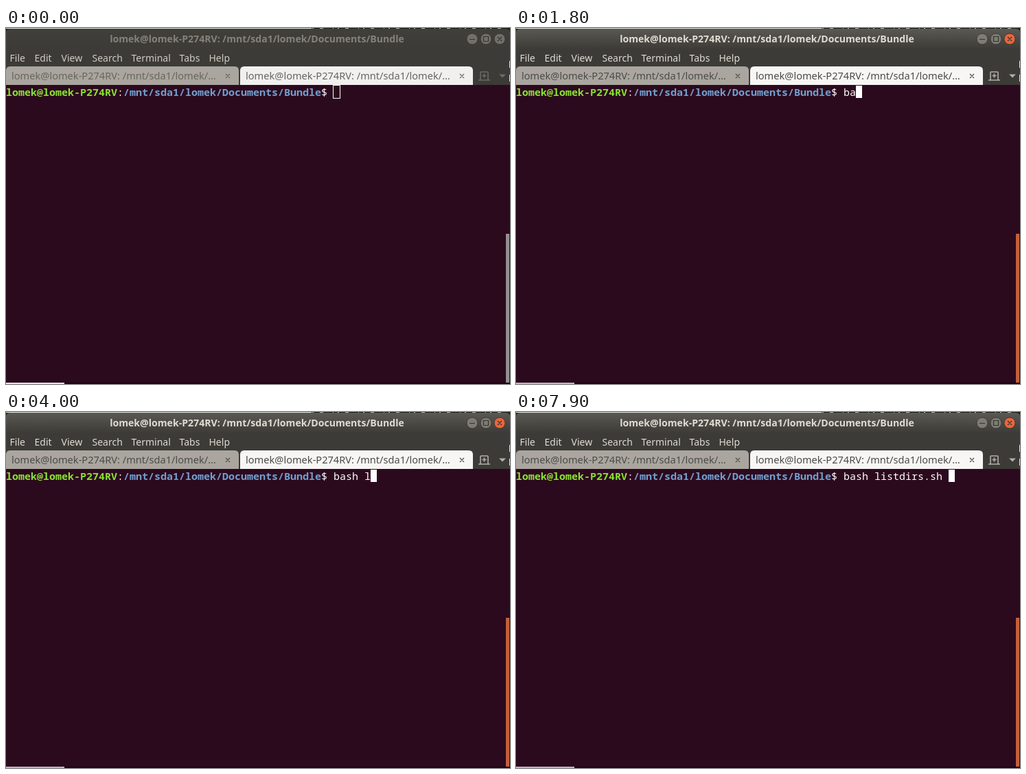
Animation of 734 by 519 pixels, one loop 8 s. Source, as an HTML page:

```html
<!DOCTYPE html>
<html lang="en">
<head>
<meta charset="utf-8">
<title>Terminal</title>
<style>
  html, body { margin: 0; width: 100%; height: 100%; overflow: hidden; background: #2c0a1e; }
  svg {
    --focus: 0%;
    --bar-top: color-mix(in srgb, #403f3a, #5b5953 var(--focus));
    --title: color-mix(in srgb, #85827a, #dfdbd2 var(--focus));
    --menu: color-mix(in srgb, #cfcbc2, #dfdbd2 var(--focus));
    --tab-text: color-mix(in srgb, #696660, #4c4b48 var(--focus));
    --tab-on: color-mix(in srgb, #f1f0ee, #f7f6f4 var(--focus));
    --tool: color-mix(in srgb, #6c6a63, #b2afa7 var(--focus));
    --button: color-mix(in srgb, #716f68, #7d7b72 var(--focus));
    --close: color-mix(in srgb, #716f68, #e9663c var(--focus));
    --scroll: color-mix(in srgb, #949091, #c4603a var(--focus));
    --strip: color-mix(in srgb, #e4e2df, #bdbab6 var(--focus));
    display: block; width: 734px; height: 519px;
  }
  text { white-space: pre; font: 14px "Noto Sans", "Open Sans", sans-serif; }
  .title { font-weight: 700; font-size: 14.1px; fill: var(--title); text-anchor: middle; }
  .menu { fill: var(--menu); }
  .tab { font-size: 14.6px; fill: var(--tab-text); }
  .term { font: 15px "Noto Sans Mono", "Liberation Mono", monospace; fill: #fff; }
  .bold { font-weight: 700; }
  .line { fill: none; stroke-width: 1.2; }
</style>
</head>
<body>
<svg id="stage" viewBox="0 0 734 519">
  <defs>
    <linearGradient id="bar" x2="0" y2="1">
      <stop offset="0" style="stop-color: var(--bar-top)"/>
      <stop offset="1" stop-color="#3c3b37"/>
    </linearGradient>
  </defs>

  <rect width="734" height="519" fill="#2c0a1e"/>
  <rect width="734" height="83" fill="#3c3b37"/>
  <rect width="734" height="6" fill="#1c1b19"/>
  <path d="M0 31V7Q0 1 6 1H728Q734 1 734 7V31Z" fill="url(#bar)"/>
  <path d="M0 .5H445" stroke="#e8e6e2"/>
  <path d="M446 .5H734" stroke="#b5b2aa" stroke-dasharray="2 9 5 14 1 6"/>
  <path d="M733.5 48V58M733.5 68V78" stroke="#e8e6e2"/>

  <text class="title" x="365.5" y="21">lomek@lomek-P274RV: /mnt/sda1/lomek/Documents/Bundle</text>

  <g stroke="#33322e">
    <g stroke-width=".8">
      <circle cx="679" cy="16" r="8" fill="var(--button)"/>
      <circle cx="699" cy="16" r="8" fill="var(--button)"/>
      <circle cx="719" cy="16" r="8" fill="var(--close)"/>
    </g>
    <path class="line" d="M675 16.5H683M695.5 12.5H702.5V19.5H695.5ZM716 13L722 19M722 13L716 19"/>
  </g>

  <g class="menu">
    <text x="5.5" y="49">File</text>
    <text x="41.5" y="49">Edit</text>
    <text x="80.5" y="49">View</text>
    <text x="125.5" y="49">Search</text>
    <text x="182.5" y="49">Terminal</text>
    <text x="252.5" y="49">Tabs</text>
    <text x="295.5" y="49">Help</text>
  </g>

  <path d="M0 83V62Q0 56 6 56H333Q339 56 339 62V83Z" fill="#aaa69f"/>
  <path d="M341 83V62Q341 56 347 56H674Q680 56 680 62V83Z" fill="var(--tab-on)"/>
  <text class="tab" x="8" y="75">lomek@lomek-P274RV: /mnt/sda1/lomek/…</text>
  <text class="tab" x="349" y="75">lomek@lomek-P274RV: /mnt/sda1/lomek/…</text>
  <path class="line" stroke="var(--tab-text)" d="M320 67L326 73M326 67L320 73M661 67L667 73M667 67L661 73"/>
  <path class="line" stroke="var(--tool)" style="stroke-width: 1.6"
        d="M688 76H691V65Q691 64 692 64H701Q702 64 702 65V76H705M688 76H705M696.5 66.5V72.5M693.5 69.5H699.5"/>
  <path d="M718 67.5H728L723 72.5Z" fill="var(--tool)"/>

  <rect x="728" y="300" width="5" height="217" fill="var(--scroll)"/>
  <rect y="517" width="734" height="2" fill="#18060f"/>
  <rect y="517" width="85" height="2" fill="var(--strip)"/>

  <text class="term bold" x="0" y="99" style="fill: #8ae234">lomek@lomek-P274RV</text>
  <text class="term" x="162" y="99">:</text>
  <text class="term bold" x="171" y="99" style="fill: #729fcf">/mnt/sda1/lomek/Documents/Bundle</text>
  <text class="term" x="459" y="99">$</text>
  <text class="term" x="477" y="99" id="typed"></text>
  <rect id="hollow" x="476.5" y="83.5" width="10" height="19" fill="none" stroke="#fff"/>
  <rect id="cursor" y="84" width="9" height="18" fill="#fff"/>
</svg>

<script>
  const LOOP = 8000, CELL = 9, INPUT_X = 477;
  const command = "bash listdirs.sh ";

  // [start ms, typed characters, cursor visible]
  const steps = [
    [0, 0, false], [800, 0, true], [1400, 0, false],
    [1800, 2, true], [1900, 3, true], [2500, 3, false],
    [2800, 5, true], [3400, 5, false], [3800, 5, true],
    [4000, 6, true], [4400, 6, false], [5000, 6, true],
    [5200, 7, true], [5400, 8, true], [5700, 9, true],
    [6200, 9, false], [6800, 9, true],
    [7000, 17, true], [7400, 17, false], [7900, 17, true]
  ];

  const [stage, typed, hollow, cursor] =
    ["stage", "typed", "hollow", "cursor"].map(id => document.getElementById(id));
  const show = (el, on) => el.setAttribute("visibility", on ? "visible" : "hidden");

  function draw() {
    const t = performance.now() % LOOP;
    const [, count, on] = steps.findLast(([start]) => start <= t);
    stage.style.setProperty("--focus", t < 800 ? "0%" : t < 900 ? "50%" : "100%");
    typed.textContent = command.slice(0, count);
    cursor.setAttribute("x", INPUT_X + count * CELL);
    show(cursor, on);
    show(hollow, t < 800);
    requestAnimationFrame(draw);
  }
  draw();
</script>
</body>
</html>
```
